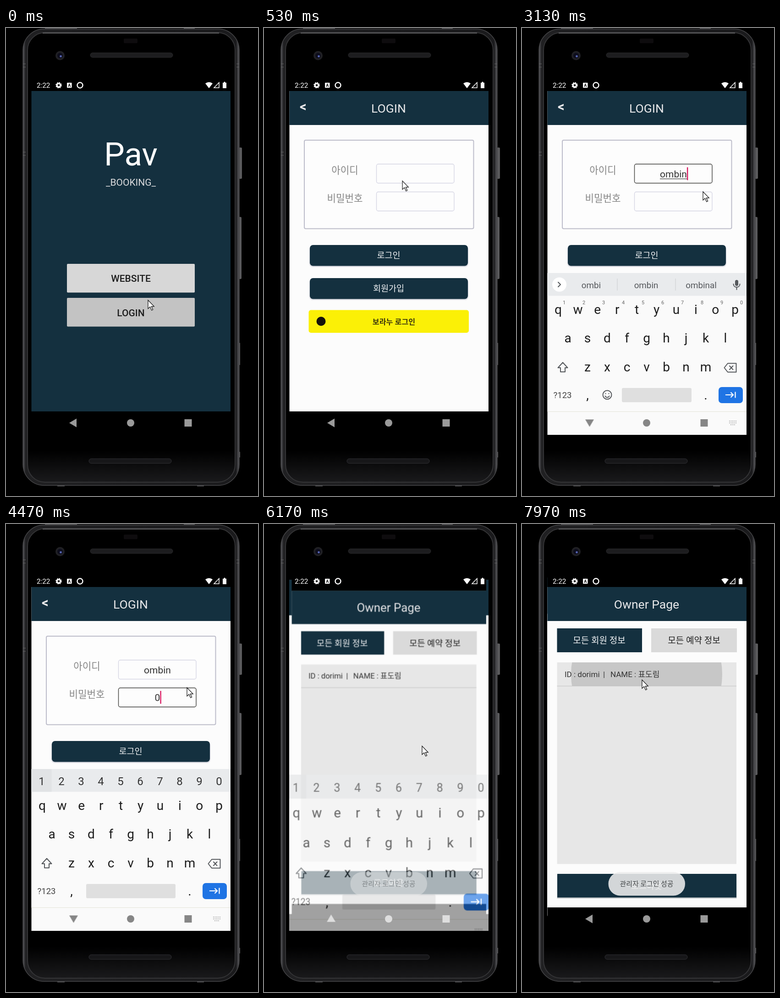
Recreate the animation shown at these times as an HTML page. Size 550x1018 px, loop 8 s.

```html
<!DOCTYPE html>
<html lang="ko">
<head>
<meta charset="utf-8">
<title>Login demo</title>
<style>
html, body { margin: 0; width: 100%; height: 100%; overflow: hidden; background: #000; }
svg { display: block; width: 100vw; height: 100vh; }
text { font-family: Roboto, "Noto Sans CJK KR", sans-serif; white-space: pre; }
.mid { text-anchor: middle; }
.navy { fill: #14303f; }
.paper { fill: #fcfcfc; }
.pale { fill: #e9ebed; }
.medium { font-weight: 500; }
.bold { font-weight: 700; }
.label { font-size: 21.2px; fill: #858585; }
.action { font-size: 18.5px; fill: #f2f4f6; }
.field { fill: #fdfdfd; stroke: #d6d6e4; stroke-width: 1.4; }
.focus { fill: none; stroke: #4a4a44; stroke-width: 1.4; }
.line { fill: none; stroke: #55585c; stroke-width: 2; stroke-linecap: round; stroke-linejoin: round; }

.window { transform-origin: 272.5px 498px; }
.window, .anim { animation: 8s linear infinite; }
#home { animation-name: home; }
#login { animation-name: login; }
#members { animation-name: members; }
#board { animation-name: board; }
#slide { animation-name: slide; }
#toast { animation-name: toast; }
#ripple { animation-name: ripple; transform-origin: 272px 327px; }
#back { animation-name: back; transform-origin: 147px 858.5px; }
#nav { animation-name: nav; }
#pointer { animation-name: pointer; }

@keyframes home {
  0%, .375% { transform: none; opacity: 1; animation-timing-function: cubic-bezier(.05,.7,.1,1); }
  5.374% { transform: scale(1.055); opacity: 1; }
  5.375%, 100% { transform: scale(1.055); opacity: 0; }
}
@keyframes login {
  0%, .375% { transform: scale(.85); opacity: 0; animation-timing-function: cubic-bezier(.05,.7,.1,1); }
  5.375% { transform: none; opacity: 1; }
  76.125% { transform: none; opacity: 1; animation-timing-function: cubic-bezier(.05,.7,.1,1); }
  81.125%, 100% { transform: scale(1.055); opacity: 1; }
}
@keyframes members {
  0%, 76.125% { transform: scale(.85); opacity: 0; animation-timing-function: cubic-bezier(.05,.7,.1,1); }
  77.125% { transform: scale(.977); opacity: 1; animation-timing-function: ease-out; }
  81.125%, 100% { transform: none; opacity: 1; }
}
@keyframes board {
  0%, 76.125% { transform: none; animation-timing-function: cubic-bezier(.05,.7,.1,1); }
  81.125%, 100% { transform: scale(1.055); }
}
@keyframes slide {
  0%, 10.8% { transform: translateY(180px); opacity: 0; animation-timing-function: ease-out; }
  13.5%, 76.125% { transform: none; opacity: 1; }
  77.125% { transform: translateY(10px); opacity: .65; }
  79%, 100% { transform: translateY(70px); opacity: 0; }
}
@keyframes toast {
  0%, 76.5% { opacity: 0; }
  77.125% { opacity: .42; }
  79.5%, 99% { opacity: .92; }
  99.625%, 100% { opacity: .88; }
}
@keyframes ripple {
  0%, 98.9% { transform: scale(0); opacity: 0; }
  99.125% { transform: scale(.75); opacity: .09; }
  99.625%, 100% { transform: none; opacity: .14; }
}
@keyframes back {
  0%, 10.9% { transform: none; }
  13.2%, 76.125% { transform: rotate(-90deg); }
  77.125% { transform: rotate(-270deg); }
  79%, 100% { transform: rotate(-360deg); }
}
@keyframes nav {
  0%, 10.9% { fill: #9a9a9a; }
  13.2%, 76.125% { fill: #868686; }
  77.125% { fill: #dedede; }
  80%, 100% { fill: #9a9a9a; }
}
@keyframes pointer {
  0%, 2% { transform: translate(310px,592px); animation-timing-function: ease-in-out; }
  6.5% { transform: translate(302px,333px); }
  10.4% { transform: translate(304px,322px); animation-timing-function: ease-out; }
  14.1% { transform: translate(385px,349px); }
  17.4%, 66% { transform: translate(395px,356px); animation-timing-function: ease-in-out; }
  73%, 87% { transform: translate(345px,483px); animation-timing-function: ease-in-out; }
  96%, 100% { transform: translate(262px,339px); }
}
</style>
</head>
<body>
<svg viewBox="0 0 550 1018" xmlns="http://www.w3.org/2000/svg">
  <defs>
    <linearGradient id="rim">
      <stop offset="0" stop-color="#5a5a5e"/><stop offset=".012" stop-color="#202022"/>
      <stop offset=".985" stop-color="#1a1a1c"/><stop offset="1" stop-color="#5c5c60"/>
    </linearGradient>
    <linearGradient id="glass" x2="0" y2="1">
      <stop offset=".93" stop-color="#000"/><stop offset="1" stop-color="#1a1a1c"/>
    </linearGradient>
    <clipPath id="screen"><path d="M55.5 112H490V885H55.5Z"/></clipPath>
    <clipPath id="row"><path d="M76.5 301H468V352H76.5Z"/></clipPath>
    <g id="gear">
      <circle r="3.9" fill="none" stroke-width="3.2"/>
      <circle r="5.8" fill="none" stroke-width="2" stroke-dasharray="2.4 2.155"/>
    </g>
    <g id="bars"><path d="M55.5 112H490V137H55.5ZM55.5 834H490V885H55.5Z"/></g>
  </defs>

  <!-- phone body -->
  <rect width="550" height="1018"/>
  <g fill="#5b5b5d">
    <rect x="507" y="260" width="8" height="68" rx="2"/>
    <rect x="507" y="411" width="7" height="135" rx="2"/>
    <rect x="507" y="685" width="4" height="48"/>
    <rect x="507" y="922" width="4" height="12"/>
    <path d="M85 0H155V2H85ZM388 0H412V3H388ZM112 994H128V997H112ZM417 994H432V997H417Z"/>
  </g>
  <rect x="37" y="2" width="472" height="993" rx="46" fill="url(#rim)" stroke="#464648" stroke-width="1.5"/>
  <rect x="47" y="10" width="453" height="978" rx="38" fill="url(#glass)" stroke="#343436" stroke-width="2"/>
  <path d="M80 11H465" stroke="#77777a" stroke-width="1.5"/>
  <path d="M37 78H43M37 85H43M37 270H43M37 277H43M503 78H509M503 85H509" stroke="#666"/>
  <rect x="257" y="23" width="30" height="10" rx="2" fill="#0e0c0e"/>
  <rect x="184" y="54" width="180" height="10" rx="5" fill="#1d1d1f" stroke="#2a2a2c"/>
  <rect x="181" y="937" width="180" height="10" rx="5" fill="#171719" stroke="#303034"/>
  <circle cx="118" cy="60" r="10" fill="#202024"/>
  <circle cx="118" cy="60" r="6" fill="#0d0d1c"/>
  <circle cx="119.5" cy="61.5" r="2.3" fill="#5968b8"/>

  <g clip-path="url(#screen)">
    <!-- start page -->
    <g id="home" class="window">
      <rect class="navy" x="55.5" y="137" width="434.5" height="697"/>
      <use href="#bars"/>
      <text class="mid" x="272.5" y="299" font-size="71" fill="#fff">Pav</text>
      <text class="mid" x="272.5" y="342.5" font-size="21" fill="#dcdcde">_BOOKING_</text>
      <rect x="133" y="513" width="279" height="62.5" rx="2" fill="#d7d7d7"/>
      <rect x="133" y="587" width="279" height="62.5" rx="2" fill="#c3c3c3"/>
      <g class="mid medium" font-size="21" fill="#1c1c1c">
        <text x="272.5" y="552">WEBSITE</text>
        <text x="272.5" y="626.5">LOGIN</text>
      </g>
    </g>

    <!-- login page -->
    <g id="login" class="window">
      <rect class="paper" x="55.5" y="137" width="434.5" height="697"/>
      <use href="#bars"/>
      <rect class="navy" x="55.5" y="137" width="434.5" height="74"/>
      <text class="bold" x="78" y="181" font-size="29" fill="#e8e8ea">&lt;</text>
      <text class="mid" x="272" y="184" font-size="26.5" fill="#e8e8ea">LOGIN</text>
      <rect x="88" y="244" width="369.5" height="192.5" rx="3" fill="#fdfdfd" stroke="#bdbdca" stroke-width="2"/>
      <g class="mid label">
        <text x="176.5" y="317">아이디</text>
        <text x="176.5" y="377.5">비밀번호</text>
      </g>
      <rect class="field" x="245.5" y="296" width="169.5" height="41.5" rx="4"/>
      <rect class="field" x="245.5" y="356.5" width="169.5" height="41.5" rx="4"/>
      <rect class="focus" data-on="833 3870" x="245.5" y="296" width="169.5" height="41.5" rx="4"/>
      <rect class="focus" data-on="3870 8000" x="245.5" y="356.5" width="169.5" height="41.5" rx="4"/>
      <g id="inputs"></g>
      <g fill="#e0e0e6">
        <rect x="98.5" y="474" width="348" height="46" rx="8"/>
        <rect x="98.5" y="546" width="348" height="46" rx="8"/>
      </g>
      <rect class="navy" x="100" y="472" width="345" height="45.5" rx="7"/>
      <rect class="navy" x="100" y="544" width="345" height="45.5" rx="7"/>
      <rect x="97.5" y="613.5" width="349.5" height="49.5" rx="5" fill="#fbf006"/>
      <circle cx="124.5" cy="638" r="10" fill="#14120a"/>
      <g class="mid action">
        <text x="272" y="501">로그인</text>
        <text x="272" y="573">회원가입</text>
      </g>
      <text class="mid bold" x="283.5" y="645" font-size="16.2" fill="#3b360c">보라누 로그인</text>
    </g>

    <!-- member list page -->
    <g id="members" class="window">
      <rect class="paper" x="55.5" y="137" width="434.5" height="697"/>
      <use href="#bars"/>
      <rect class="navy" x="55.5" y="137" width="434.5" height="74"/>
      <text class="mid" x="272" y="184" font-size="26.5" fill="#e8e8ea">Owner Page</text>
      <rect class="navy" x="76.5" y="227" width="185.5" height="52"/>
      <rect x="282" y="227" width="187" height="52" fill="#dadada"/>
      <g class="mid" font-size="19">
        <text x="168.5" y="260" fill="#f2f4f6">모든 회원 정보</text>
        <text x="375.5" y="260" fill="#222">모든 예약 정보</text>
      </g>
      <rect x="76.5" y="301" width="391.5" height="438.5" fill="#e7e7e7"/>
      <path d="M76.5 352.5H468" stroke="#cdcdcd" stroke-width="1.4"/>
      <g clip-path="url(#row)"><circle id="ripple" class="anim" cx="272" cy="327" r="165"/></g>
      <g font-size="17" fill="#333">
        <text x="93" y="332.5">ID : dorimi</text>
        <text x="177" y="332.5">|</text>
        <text x="193" y="332.5">NAME : 표도림</text>
      </g>
      <rect x="76.5" y="763" width="392" height="52" fill="#d0d2d4"/>
      <rect class="navy" x="77" y="761" width="391" height="51.5"/>
      <text class="mid action" x="272" y="794">로그아웃</text>
    </g>

    <!-- keyboard -->
    <g id="board" class="window"><g id="slide" class="anim">
      <rect x="55.5" y="533" width="434.5" height="352" fill="#fafafa"/>
      <rect class="pale" x="55.5" y="533" width="434.5" height="49.5"/>
      <path d="M55.5 834.5H490" stroke="#e3e3d8"/>
      <g id="keys"></g>

      <g data-on="870 3870">
        <circle cx="81.5" cy="558" r="15.5" fill="#fff"/>
        <g id="hints" class="mid" fill="#666" font-size="11"></g>
        <g fill="#55585c">
          <rect x="465" y="548" width="7" height="13" rx="3.5"/>
          <path class="line" d="M461.5 557C461.5 566 475.5 566 475.5 557M468.5 564V569"/>
        </g>
        <g class="line">
          <circle cx="186" cy="798" r="9.5"/>
          <path d="M181.5 800.5C183 804.5 189 804.5 190.5 800.5M182.5 795V795.5M189.5 795V795.5"/>
        </g>
        <rect x="218" y="783" width="152" height="31" rx="3" fill="#dfdfdf"/>
      </g>

      <g data-on="870 1200">
        <path class="line" d="M84 553L79 558L84 563"/>
        <g class="line">
          <path d="M132 551H147V561L142 566H132ZM136 555H137M142 555H143M136 560Q139.5 563 143 560"/>
          <path d="M258 552H272V568H258ZM262 550H268V553H262ZM261.5 557H268.5M261.5 560.5H268.5M261.5 564H266"/>
        </g>
        <text class="mid bold" x="201" y="563.5" font-size="14" letter-spacing="1" fill="#55585c">GIF</text>
        <use href="#gear" transform="translate(328 559) scale(1.3)" stroke="#55585c"/>
        <path d="M366.5 546V571" stroke="#d5d7da"/>
        <g fill="#55585c"><circle cx="398.5" cy="559" r="2.2"/><circle cx="405" cy="559" r="2.2"/><circle cx="411.5" cy="559" r="2.2"/></g>
      </g>

      <g data-on="1200 3870">
        <path class="line" d="M79 553L84 558L79 563"/>
        <path d="M208 545V571M335 545V571" stroke="#c9cbce"/>
        <g id="words" class="mid" font-size="18.8" fill="#55585c"></g>
      </g>

      <g data-on="3870 8000">
        <rect x="55.5" y="533" width="44" height="49.5" fill="#e1e3e5"/>
        <g id="digits" class="mid" font-size="24" fill="#333"></g>
        <rect x="175" y="783" width="195" height="31" rx="3" fill="#dfdfdf"/>
      </g>

      <text x="68.5" y="805" font-size="18.5" fill="#444">?123</text>
      <path class="line" d="M89 727.5L78.5 739H84V748H94V739H99.5Z"/>
      <path class="line" d="M449 729.5H467.5V748.5H449L441.5 739ZM453 735L460.5 743M460.5 735L453 743"/>
      <rect x="429" y="781" width="53" height="35" rx="7" fill="#1f74e4"/>
      <path d="M444 798H461M455.5 792.5L461 798L455.5 803.5M465.5 791.5V804.5" fill="none" stroke="#fff" stroke-width="2.2"/>
      <path d="M452 855H469M452 859H469M455 863H466" stroke="#b5b5b5" stroke-width="2" stroke-dasharray="2 1.5"/>
    </g></g>

    <g id="nav" class="anim">
      <path id="back" class="anim" d="M138 859L154 849.5V868.5Z"/>
      <circle cx="272" cy="859" r="8"/>
      <rect x="389.5" y="851" width="16" height="16"/>
    </g>

    <g id="toast" class="anim">
      <rect x="188.5" y="757" width="167.5" height="51.5" rx="25.5" fill="#eee"/>
      <text class="mid" x="272" y="788" font-size="14.9" fill="#444">관리자 로그인 성공</text>
    </g>

    <!-- status bar -->
    <g fill="#fff">
      <text x="67" y="130" font-size="15.2">2:22</text>
      <use href="#gear" x="115" y="124.5" stroke="#fff"/>
      <rect x="133" y="119" width="10.5" height="11" rx="1"/>
      <text class="mid bold" x="138.2" y="128" font-size="9" style="fill:#000">A</text>
      <circle cx="161.5" cy="124.5" r="6" fill="none" stroke="#fff" stroke-width="2.4"/>
      <path d="M435 120.5Q443 115 451 120.5L443 131Z"/>
      <path d="M454 130H465V118.5Z" fill="none" stroke="#fff" stroke-width="1.5"/>
      <path d="M473 119H475.5V117H478.5V119H481V131H473Z"/>
    </g>
  </g>

  <path id="pointer" class="anim" d="M0 0V18.5L4.5 14.5L7.8 22L10.6 20.8L7.4 13.6H13.2Z" fill="#fff" stroke="#111" stroke-width="1.2"/>
</svg>

<script>
const NS = 'http://www.w3.org/2000/svg';
const LOOP = 8000;
const sheet = document.head.appendChild(document.createElement('style'));
let rules = 0;

function add(parent, tag, attrs, text = '') {
  const el = document.createElementNS(NS, tag);
  for (const key in attrs) el.setAttribute(key, attrs[key]);
  el.textContent = text;
  parent.append(el);
  return el;
}

// Hard switch: the element shows only between two times.
function show(el, from, to) {
  const name = 'on' + rules++;
  const at = t => t / LOOP * 100 + '%';
  sheet.append(`@keyframes ${name}{0%{opacity:0}${at(from)}{opacity:1}${at(to)}{opacity:0}100%{opacity:0}}`);
  el.style.animation = `${name} ${LOOP}ms step-end infinite`;
}

function letters(parent, chars, x, y, step = 42.9) {
  [...chars].forEach((c, i) => add(parent, 'text', { x: x + i * step, y }, c));
}

const get = id => document.getElementById(id);

const keys = get('keys');
keys.setAttribute('class', 'mid');
keys.setAttribute('font-size', 28);
keys.setAttribute('fill', '#1c1c1c');
letters(keys, 'qwertyuiop', 79, 622);
letters(keys, 'asdfghjkl', 100, 684, 43);
letters(keys, 'zxcvbnm', 143, 747, 43);
letters(keys, ',', 143, 808);
letters(keys, '.', 401, 808);
letters(get('hints'), '1234567890', 92, 601, 43);
letters(get('digits'), '1234567890', 78, 568, 43);

[
  [1200, 2030, 'o', 'of', 'on'],
  [2030, 2230, 'om', 'omit', 'omega'],
  [2230, 2960, 'omb', 'ombu', 'omber'],
  [2960, 3870, 'ombi', 'ombin', 'ombinal']
].forEach(([from, to, ...words]) => {
  const group = add(get('words'), 'g', {});
  words.forEach((w, i) => add(group, 'text', { x: 151 + i * 120, y: 566 }, w));
  show(group, from, to);
});

// Typed text, its start and end, baseline, and when its caret goes out.
const ID = 325, PW = 385;
[
  ['', 870, 1100, ID, 1100],
  ['o', 1100, 2000, ID, 1670],
  ['om', 2000, 2230, ID, 2230],
  ['omb', 2230, 2930, ID, 2730],
  ['ombi', 2930, 3100, ID, 3100],
  ['ombin', 3100, 3870, ID, 3870],
  ['ombin', 3870, LOOP, ID, 0],
  ['', 3870, 4400, PW, 4370],
  ['0', 4400, 4770, PW, 4770],
  ['•0', 4770, 4930, PW, 4930],
  ['••0', 4930, 5100, PW, 5100],
  ['•••0', 5100, 5400, PW, 5400],
  ['••••', 5400, LOOP, PW, 5600]
].forEach(([word, from, to, y, out]) => {
  const group = add(get('inputs'), 'g', {});
  const text = add(group, 'text', { x: 330.5, y, class: 'mid', 'font-size': 21, fill: '#333' }, word);
  const width = word ? text.getComputedTextLength() : 0;
  if (y === ID && out && word && from > 1100)
    add(group, 'rect', { x: 330.5 - width / 2, y: y + 2.5, width, height: 1.3, fill: '#444' });
  if (out) {
    const caret = add(group, 'rect', { x: 330.5 + width / 2, y: y - 22, width: 2.4, height: 28, fill: '#d81b60' });
    show(caret, from, out);
  }
  show(group, from, to);
});

document.querySelectorAll('[data-on]').forEach(el => show(el, ...el.dataset.on.split(' ').map(Number)));
</script>
</body>
</html>
```
